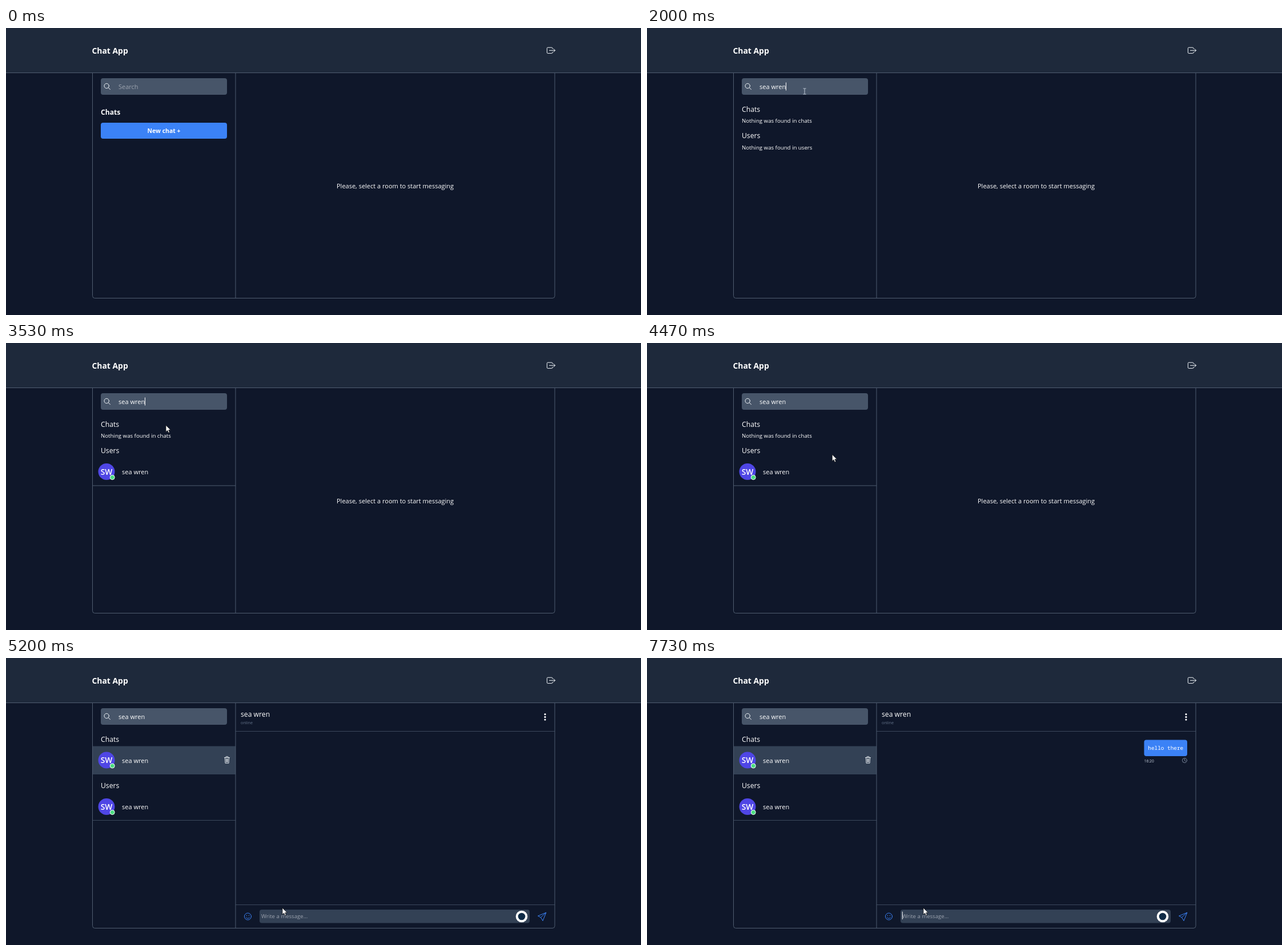
These frames come from a looping animation (1112 px wide and 503 px high, 8 s). An HTML page:

```html
<!DOCTYPE html>
<html lang="en">
<head>
<meta charset="utf-8">
<title>Chat App</title>
<style>
  html, body { margin: 0; width: 100%; height: 100%; overflow: hidden; background: #0f172a; }
  svg { display: block; width: 100%; height: 100%; }
  text { font: 11px "Open Sans", "Noto Sans", sans-serif; fill: #fff; white-space: pre; }
  .bold { font-weight: 700; }
  .head { font-size: 12.2px; }
  .small { font-size: 9.67px; }
  .hint { fill: #9ca3af; }
  .line { fill: none; stroke: #4f5c70; }
  .soft { fill: none; stroke: #334155; }
  .icon { fill: none; stroke: #f1f5f9; stroke-linecap: round; stroke-linejoin: round; }
  .blue { stroke: #3b82f6; }
  .initials { font-size: 13.8px; font-weight: 600; text-anchor: middle; }
</style>
</head>
<body>
<svg viewBox="0 0 1112 503">
  <defs>
    <g id="contact">
      <circle cx="176" r="14.5" fill="#4f46e5"/>
      <text class="initials" x="176" y="5.2">SW</text>
      <circle cx="186.2" cy="10" r="4" fill="#4ade80" stroke="#fff"/>
      <text x="203" y="4.6">sea wren</text>
    </g>
  </defs>

  <rect width="1112" height="503" fill="#0f172a"/>
  <rect width="1112" height="78" fill="#1e293b"/>
  <path class="line" d="M0 78.5H1112"/>
  <text class="bold" x="150.5" y="45.2" style="font-size:13.9px">Chat App</text>
  <path class="icon" d="M957 36.5v-1q0-1.3-1.3-1.3h-7q-1.3 0-1.3 1.3v7.6q0 1.3 1.3 1.3h7q1.3 0 1.3-1.3v-1M951.500 39.300h10M958.800 36.500l2.800 2.800-2.800 2.800"/>

  <!-- sidebar -->
  <rect x="166" y="88" width="221" height="29" rx="4" fill="#475569"/>
  <path class="icon" d="M179.300 104.600l3.200 3.200"/>
  <circle class="icon" cx="176.200" cy="101.500" r="4.200"/>
  <text class="hint" x="197" y="107" data-show="0-1530">Search</text>
  <text id="query" x="197" y="107"></text>

  <g data-show="0-1530">
    <text class="bold" x="166" y="152" style="font-size:12.1px">Chats</text>
    <rect x="166" y="166" width="221" height="28" rx="4" fill="#3b82f6"/>
    <text class="bold" x="276.500" y="184" text-anchor="middle" style="font-size:10.45px">New chat +</text>
  </g>
  <text class="head" x="166" y="146.500" data-show="1530-8000">Chats</text>
  <g data-show="1530-4670">
    <text class="small" x="166" y="166">Nothing was found in chats</text>
    <text class="head" x="166" y="192.500">Users</text>
  </g>
  <text class="small" x="166" y="212.500" data-show="1530-2470">Nothing was found in users</text>
  <g data-show="3070-4670">
    <use href="#contact" y="225.500"/>
    <path class="line" d="M152 250H402"/>
  </g>
  <text x="579" y="281" data-show="0-4670">Please, select a room to start messaging</text>

  <!-- open room -->
  <g data-show="4670-8000">
    <rect x="152" y="154.500" width="250" height="49.500" fill="#334155"/>
    <use href="#contact" y="179"/>
    <path class="icon" stroke-width=".9" d="M382.500 174.500h9M385.200 174.300v-1.500h3.600v1.500M383.400 174.700l.6 9.600h6l.6-9.600M385.600 176.700l.2 5.600M387 176.700v5.600M388.400 176.700l-.2 5.600"/>
    <text class="head" x="166" y="227.500">Users</text>
    <use href="#contact" y="260.500"/>
    <path class="soft" d="M152 284.500H402M402 128.500H961M402 432.500H961" style="stroke:#3b485c"/>
    <text class="head" x="411" y="102.700">sea wren</text>
    <text x="411" y="116.300" style="font-size:7.25px;fill:#64748b">online</text>
    <g fill="#fff">
      <circle cx="944" cy="98.700" r="1.600"/><circle cx="944" cy="103.400" r="1.600"/><circle cx="944" cy="108.100" r="1.600"/>
    </g>
    <circle class="icon blue" cx="423.500" cy="453" r="6"/>
    <path class="icon blue" d="M420.500 455q3 3 6 0M421.500 451v.8M425.500 451v.8"/>
    <rect x="444" y="441" width="473" height="23.500" rx="4" fill="#334155"/>
    <text id="hint" class="hint" x="447" y="455.800" style="font-size:9.6px">Write a message...</text>
    <text id="draft" x="447" y="455.800" style="font-size:9.6px"></text>
    <circle cx="903" cy="453" r="10.300" fill="#fff"/>
    <circle cx="903" cy="453" r="6.300" fill="#0f2b46"/>
    <path class="icon blue" d="M945.500 446.300l-14 5.800 5 2.600 3.300 5.500zL936.500 454.700"/>
  </g>
  <g data-show="7670-8000">
    <rect x="870.500" y="143.500" width="75.500" height="28.500" rx="4" fill="#3b82f6"/>
    <text x="877.300" y="161" style="font:9.4px 'Noto Sans Mono','DejaVu Sans Mono',monospace">hello there</text>
    <text x="870.700" y="182.800" style="font-size:6.7px;fill:#cbd5e1">16:20</text>
  </g>
  <path class="icon" data-show="7730-8000" stroke-width=".8" style="stroke:#94a3b8" d="M945.500 179.500a4 4 0 1 1-8 0a4 4 0 1 1 8 0M941.500 177v2.700l1.800 1"/>

  <path class="line" d="M151.500 79V469.500q0 4 4 4H957q4 0 4-4V79M402 79V473"/>
  <path id="queryCaret" stroke="#fff" d="M.3 95.500v14"/>
  <path id="draftCaret" stroke="#fff" d="M.3 444.500v13.500"/>
  <path id="arrow" fill="#fff" stroke="#111" stroke-width=".7" d="M0 0V11.500L2.700 9 4.500 13.200 6.400 12.400 4.700 8.300H8.200Z"/>
  <path id="beam" fill="none" stroke="#cbd5e1" stroke-width=".9" d="M-2.500-5h2q.5 0 .5.5v9q0 .5-.5.5h-2M2.500-5h-2q-.5 0-.5.5M2.500 5h-2q-.5 0-.5-.5"/>
</svg>
<script>
const LOOP = 8000, FPS = 15;
const $ = id => document.getElementById(id);
const timed = [...document.querySelectorAll('[data-show]')].map(el => [el, ...el.dataset.show.split('-').map(Number)]);
const toggle = (el, on) => { el.style.display = on ? '' : 'none'; };
const within = (t, a, b) => t >= a && t < b;

// time, x, y of the pointer
const path = [
  [66, 933, 386], [733, 276, 111], [3466, 276, 111], [3533, 280, 144], [3866, 292, 231],
  [4266, 292, 231], [4466, 324, 195], [5133, 478, 430], [5200, 484, 438]
];

// time and text of the message being typed, with one typo corrected
const drafts = [
  [0, ''], [5800, 'h'], [5870, 'he'], [6000, 'hel'], [6070, 'hell'], [6270, 'hello'], [6330, 'hello '],
  [6470, 'hello t'], [6600, 'hello te'], [6670, 'hello teh'], [6800, 'hello tehr'], [6930, 'hello teh'],
  [7070, 'hello te'], [7130, 'hello t'], [7270, 'hello th'], [7330, 'hello the'], [7400, 'hello ther'],
  [7530, 'hello there'], [7670, '']
];

function pointerAt(t) {
  const i = path.findLastIndex(p => p[0] <= t);
  const [t0, x0, y0] = path[i];
  const [t1, x1, y1] = path[i + 1] || [LOOP, x0, y0];
  const k = 1 - (1 - (t - t0) / (t1 - t0)) ** 2;
  return [x0 + (x1 - x0) * k, y0 + (y1 - y0) * k];
}

function placeCaret(caret, field, on) {
  toggle(caret, on);
  const x = +field.getAttribute('x') + field.getComputedTextLength();
  caret.setAttribute('transform', `translate(${x})`);
}

function draw(t) {
  const tick = Math.floor((t + 4) * FPS / 1000);
  const stepped = tick * 1000 / FPS;
  for (const [el, from, to] of timed) toggle(el, within(t, from, to));

  const typed = Math.max(0, Math.min(8, tick - 22));
  $('query').textContent = 'sea wren'.slice(0, typed);
  placeCaret($('queryCaret'), $('query'),
    within(t, 930, 1470) || within(t, 1530, 2530) || within(t, 3070, 3600));

  const draft = drafts.findLast(d => d[0] <= t)[1];
  $('draft').textContent = draft;
  toggle($('hint'), !draft);
  placeCaret($('draftCaret'), $('draft'), t >= 5600);

  const moving = t >= 70;
  const [x, y] = moving ? pointerAt(stepped) : [0, 0];
  const overSearch = within(x, 166, 387) && within(y, 88, 117);
  for (const id of ['arrow', 'beam']) {
    toggle($(id), moving && overSearch === (id === 'beam'));
    $(id).setAttribute('transform', `translate(${x} ${y})`);
  }
}

const start = performance.now();
function loop() {
  draw((performance.now() - start) % LOOP);
  requestAnimationFrame(loop);
}
loop();
</script>
</body>
</html>
```
